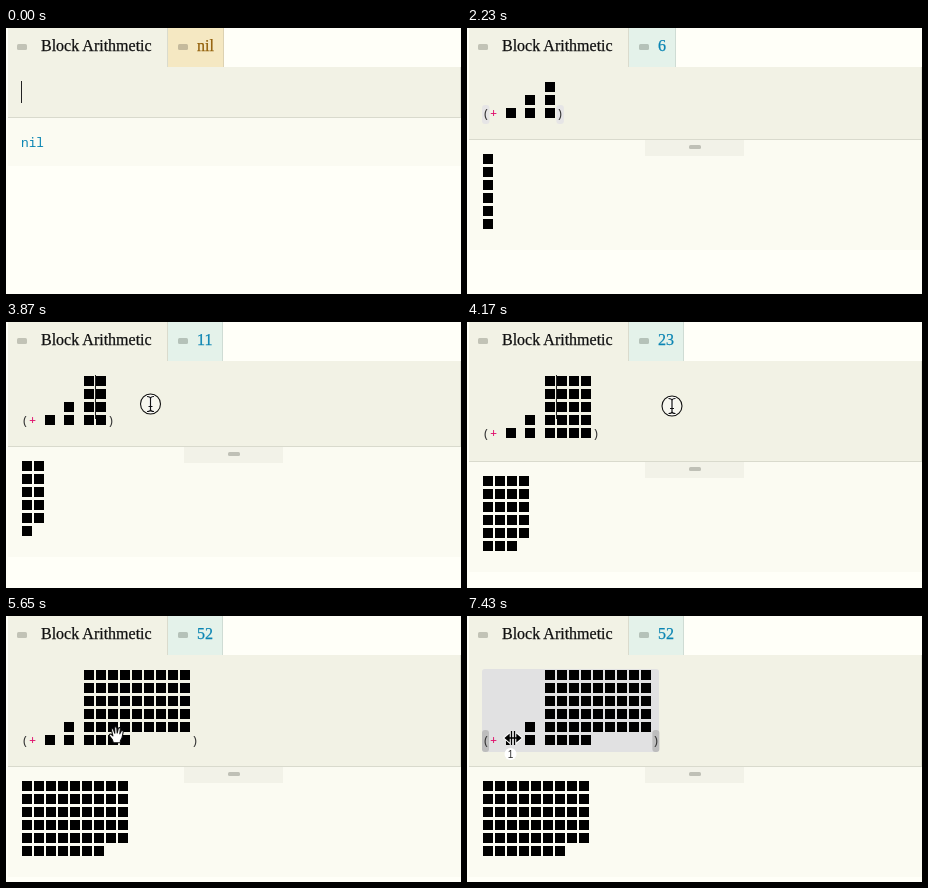
An HTML page that plays this animation: 455 px wide and 266 px high, repeating every 8 s.

```html
<!DOCTYPE html>
<html lang="en">
<head>
<meta charset="utf-8">
<title>Block Arithmetic</title>
<style>
  html, body { margin: 0; width: 100%; height: 100%; overflow: hidden; background: #fffff8; }
  svg { display: block; width: 455px; height: 266px; }
  .tab { font: 16px "Liberation Serif", serif; stroke-width: .25px; }
  .code { font: 12.75px "Noto Sans Mono", monospace; fill: #333; }
  .tag { font: 10px "Liberation Sans", sans-serif; text-anchor: middle; fill: #333; }
</style>
</head>
<body>
<svg id="stage" viewBox="0 0 455 266"></svg>
<script>
const LOOP = 8000, CHAR = 7.67, LEFT = 15, TOP = 53;
const stage = document.getElementById('stage');

// The picture only changes at these moments.
const steps = [0, 140, 740, 890, 1040, 1190, 1340, 1480, 1630, 2230,
  2530, 2680, 2830, 2980, 3120, 3270, 3420, 3570,
  3720, 3870, 4020, 4170, 4320, 4460, 4610, 4760,
  5060, 5210, 5360, 5500, 5650, 5790, 5940,
  6240, 6390, 6540, 6990, 7130, 7430];

const caretOn = [[0, 140], [740, 2230], [2680, 3270], [3870, 5360], [5790, 6390], [6990, 7430]];

const mousePath = [[2530, 278, 256], [2980, 135, 122], [3270, 91, 82], [3570, 84, 80],
  [4170, 205, 84], [4460, 252, 86], [4760, 273, 88], [5060, 268, 90], [5360, 190, 108],
  [5790, 72, 124], [5940, 63, 124], [6240, 54, 124], [6540, 43, 124],
  [6990, 44, 123], [7130, 46, 122]];

const counter = [[3570, 3], [3720, 4], [3870, 8], [4170, 20], [4460, 38], [4610, 45], [4760, 49]];

const within = (t, a, b) => t >= a && t < b;

function track(keys, t, col = 1) {
  const i = keys.findIndex(k => k[0] > t);
  if (i < 0) return keys[keys.length - 1][col];
  if (i === 0) return keys[0][col];
  const a = keys[i - 1], b = keys[i];
  return a[col] + (b[col] - a[col]) * (t - a[0]) / (b[0] - a[0]);
}

const rect = (x, y, w, h, fill, r = 0) =>
  `<rect x="${x}" y="${y}" width="${w}" height="${h}" rx="${r}" fill="${fill}"/>`;
const text = (x, y, cls, s, attr = '') => `<text x="${x}" y="${y}" class="${cls}" ${attr}>${s}</text>`;

// Numbers fill rows from the top, at most six rows high.
const colsOf = n => Math.ceil(n / 6);
const rowsOf = n => n ? Math.ceil(n / colsOf(n)) : 0;

function blocks(n, x, y) {
  const cols = colsOf(n);
  let d = '';
  for (let i = 0; i < n; i++)
    d += `M${x + i % cols * 12} ${y + Math.floor(i / cols) * 13}h10v10h-10z`;
  return `<path d="${d}"/>`;
}

function argsAt(t) {
  if (t < 1190) return [];
  if (t < 1480) return [1];
  if (t < 1630) return [1, 2];
  return [1, 2, Math.round(track(counter, t))];
}

function tabs(value) {
  const nil = value === 'nil';
  const edge = 200 + (nil ? 17 : 8 * String(value).length);
  const ink = nil ? '#925f08' : '#0a85b3';
  return rect(2, 0, 159, 39, '#f2f2e5') + rect(161, 0, 1, 39, '#dadbcd') +
    rect(162, 0, edge - 162, 39, nil ? '#f5e8c2' : '#e4f2ea') +
    rect(edge, 0, 1, 39, nil ? '#ddd2b2' : '#cfdcd4') +
    rect(11, 16, 10, 6, '#c2c3b6', 1.5) +
    rect(172, 16, 10, 6, nil ? '#c5ba9c' : '#b5c2b9', 1.5) +
    text(35, 23, 'tab', 'Block Arithmetic', 'fill="#111" stroke="#111"') +
    text(191, 23, 'tab', value, `fill="${ink}" stroke="${ink}"`);
}

function brackets(t, end, base) {
  const pair = (dy, h, fill, w) =>
    rect(LEFT, base + dy, w, h, fill, 3) + rect(end, base + dy, w, h, fill, 3);
  if (within(t, 740, 3120) || within(t, 4760, 5060)) return pair(-13, 19, '#e6e5e6', 7.5);
  if (within(t, 3120, 3570)) return pair(-15, 22, '#86dcf7', 7.5);
  if (t >= 7430) return pair(-15, 22, '#bdbdbd', 7);
  return '';
}

const pointers = {
  beam: `<path d="M-3.5 -7.5Q0 -7.5 0 -5.5Q0 -7.5 3.5 -7.5M0 -6V6M-3.5 7.5Q0 7.5 0 5.5Q0 7.5 3.5 7.5M-2 2.5H2"
    fill="none" stroke="#fff" stroke-width="3"/>
    <path d="M-3.5 -7.5Q0 -7.5 0 -5.5Q0 -7.5 3.5 -7.5M0 -6V6M-3.5 7.5Q0 7.5 0 5.5Q0 7.5 3.5 7.5M-2 2.5H2"
    fill="none" stroke="#111" stroke-width="1.2"/>`,
  hand: `<path d="M-3 8L-4 5L-7 1Q-7.5 -1 -5.5 -.8L-3.5 1L-5 -5Q-4.5 -7 -3 -5.6L-1.6 -1.5L-1.8 -7
    Q-.8 -9 .4 -7L.8 -1.8L2 -6.6Q3.4 -8 4 -6L3.4 -1L5 -4Q6.8 -5 6.8 -3L5.6 3L4 6V8Z"
    fill="#fff" stroke="#111" stroke-width="1.1" stroke-linejoin="round"/>`,
  scrub: `<path d="M-1.5 -7V7M1.5 -7V7M-6 0H6M-7.5 0L-4 -3V3ZM7.5 0L4 -3V3Z"
    stroke="#fff" stroke-width="3.4" fill="#fff"/>
    <path d="M-1.5 -7V7M1.5 -7V7M-6 0H6M-7.5 0L-4 -3V3ZM7.5 0L4 -3V3Z"
    stroke="#000" stroke-width="1.4" fill="#000"/>`
};

function mouse(t) {
  if (t < 2530) return '';
  const x = track(mousePath, t), y = track(mousePath, t, 2);
  const pressed = within(t, 3570, 4760);
  let kind = 'beam', tag = '';
  if (within(t, 3120, 3720) || within(t, 5360, 5790)) kind = 'hand';
  if (t >= 5790) {
    kind = 'scrub';
    const first = t >= 6390;
    const cx = first ? 43.5 : 63;
    tag = `<circle cx="${cx}" cy="138" r="6" fill="#fff"/>` + text(cx, 141.5, 'tag', first ? 1 : 2);
  }
  const ring = pressed ? '<circle r="10" fill="#fff" fill-opacity=".4" stroke="#111" stroke-width="1.1"/>' : '';
  return tag + `<g transform="translate(${x.toFixed(1)} ${y.toFixed(1)})">${ring}${pointers[kind]}</g>`;
}

function draw(t) {
  const args = argsAt(t);
  const rows = Math.max(1, ...args.map(rowsOf));
  const base = rows > 1 ? 51 + 13 * rows : 68;
  const bottom = base + 21 + (rows === 5 ? 2 : 0);
  const sum = args.reduce((a, b) => a + b, 0);
  const value = t < 890 ? 'nil' : sum;
  const outBottom = Math.max(bottom + 49, bottom + 33 + 13 * rowsOf(sum));

  let x = LEFT + CHAR * (t < 890 ? 1 : 2), line = '';
  for (const n of args) {
    x += CHAR;
    line += blocks(n, Math.round(x + .6), base + 3 - 13 * rowsOf(n));
    x += 12 * colsOf(n);
  }
  if (within(t, 1040, 1190) || within(t, 1340, 1630)) x += CHAR;

  let out = tabs(value) +
    rect(2, 39, 453, bottom - 39, '#f2f2e5') + rect(2, bottom, 453, 1, '#d9dacd') +
    rect(454, 39, 1, bottom - 39, '#e0e0d4') +
    rect(2, bottom + 1, 453, outBottom - bottom - 1, '#fbfbf2');

  if (sum) {
    out += rect(178, bottom + 1, 99, 16, '#f2f2e8') + rect(222, bottom + 6, 12, 4, '#bfc0b6', 1.5) +
      blocks(sum, 16, bottom + 15);
  } else if (value === 'nil') {
    out += text(LEFT, bottom + 30, 'code', 'nil', 'style="fill:#0a85b3"');
  }

  if (t >= 7430) out += rect(LEFT, TOP, 177, base + 7 - TOP, '#e1e1e2', 3);
  if (t >= 740) {
    out += brackets(t, x, base) + text(LEFT, base, 'code', '(') + text(x, base, 'code', ')');
    if (t >= 890) out += text(LEFT + CHAR, base, 'code', '+', 'style="fill:#e0106c"');
  }
  out += line;

  if (caretOn.some(([a, b]) => within(t, a, b))) {
    const dragging = within(t, 3570, 4460);
    const cx = t < 740 ? LEFT : t >= 4460 ? 77 : dragging ? 89 : Math.floor(x);
    const end = dragging ? 97 : base + 7;
    out += rect(cx, TOP, 1, end - TOP, '#222');
  }
  stage.innerHTML = out + mouse(t);
}

let shown = -1;
const start = performance.now();
function tick() {
  const t = (performance.now() - start) % LOOP;
  const step = steps.filter(s => s <= t).pop();
  if (step !== shown) draw(shown = step);
  requestAnimationFrame(tick);
}
tick();
</script>
</body>
</html>
```
